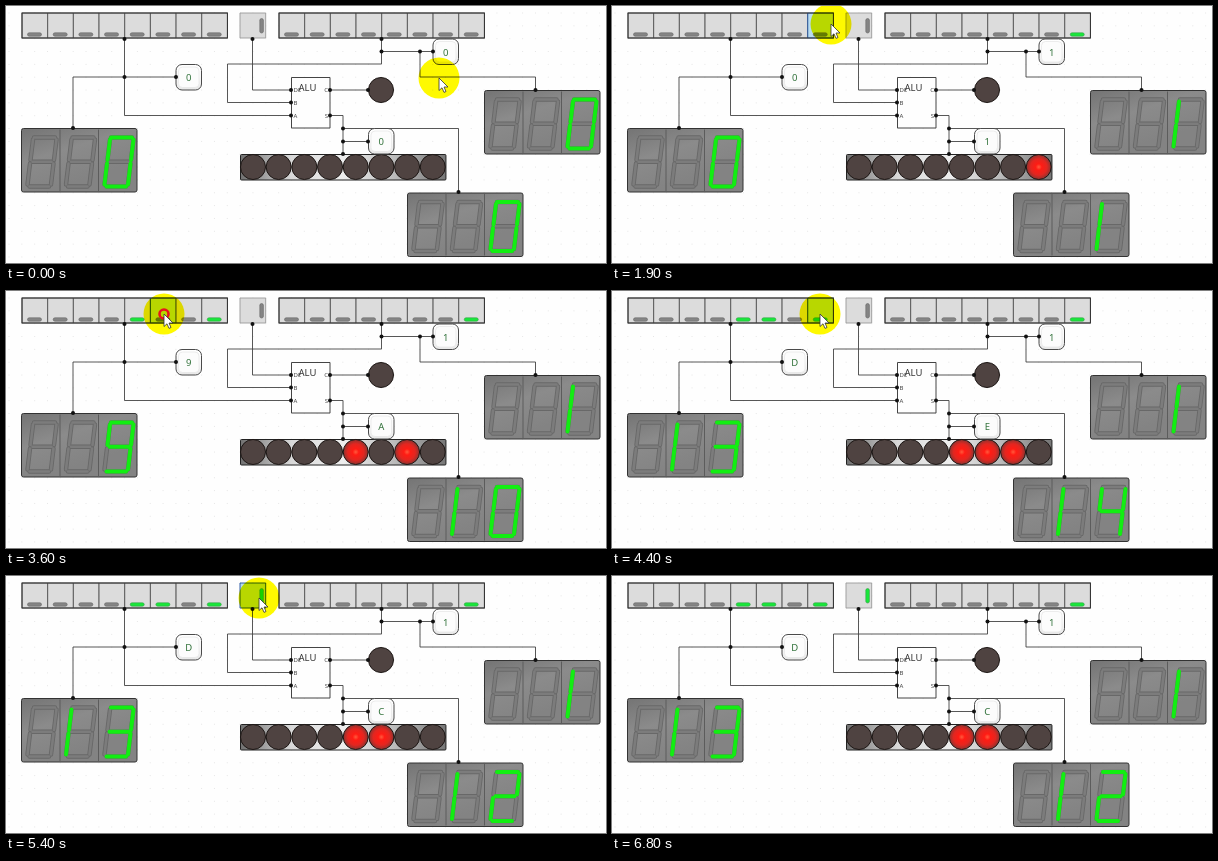
Recreate the animation shown at these times as an HTML page with a canvas. Size 600 px wide and 257 px high, loop 7300 ms.

```html
<!DOCTYPE html>
<html lang="zh">
<head>
<meta charset="utf-8">
<title>8-bit ALU</title>
<style>
  html, body { margin: 0; width: 100%; height: 100%; overflow: hidden; background: #fefefe; }
  canvas { display: block; width: 600px; height: 257px; }
</style>
</head>
<body>
<canvas></canvas>
<script>
const W = 600, H = 257, LOOP = 7300, STEP = 100;
const PITCH = 12.84, CELL = PITCH * 2;
const canvas = document.querySelector('canvas');
const dpr = window.devicePixelRatio || 1;
canvas.width = W * dpr;
canvas.height = H * dpr;
const ctx = canvas.getContext('2d');

const GREEN = '#12ee12', DARK = '#4f4341', SANS = '"Noto Sans", sans-serif';

// Cursor stops: time, x, y
const PATH = [
  [0, 433, 72], [100, 433, 71], [900, 466, 28], [1400, 466, 28],
  [1900, 219, 18], [2100, 208, 23], [2400, 208, 23], [2800, 135, 21],
  [3100, 135, 21], [3400, 158, 23], [3900, 158, 23], [4400, 208, 23],
  [4700, 208, 23], [5100, 253, 22], [5800, 253, 22], [6700, 560, 285]
];
// Each press lights the ring, then flips its input
const PRESSES = [
  { at: 1100, input: 'b', bit: 1 },
  { at: 2100, input: 'a', bit: 1 },
  { at: 2850, input: 'a', bit: 8 },
  { at: 3500, input: 'a', bit: 4 },
  { at: 5100, input: 'sub', bit: 1 }
];
const PRESS_TIME = 200;

// Segments a b c d e f g; "1" uses the left-hand pair
const DIGITS = ['abcdef', 'ef', 'abdeg', 'abcdg', 'bcfg', 'acdfg', 'acdefg', 'abc', 'abcdefg', 'abcdfg'];
const SEGMENTS = {
  a: [12.5, 9, 33.5, 9], b: [35, 11, 32.5, 31.5], c: [32, 35, 29.5, 56],
  d: [8, 58, 27.5, 58], e: [8.5, 35, 6, 56], f: [11.5, 11, 9, 31.5], g: [11, 33.3, 30, 33.3]
};

function cursorAt(t) {
  const next = PATH.findIndex(p => p[0] > t);
  if (next < 0) return [-99, -99];
  const [t0, x0, y0] = PATH[next - 1], [t1, x1, y1] = PATH[next];
  const u = (t - t0) / (t1 - t0), e = u * u * (3 - 2 * u);
  return [x0 + (x1 - x0) * e, y0 + (y1 - y0) * e];
}

function gradient(x0, y0, x1, y1, ...colors) {
  const g = ctx.createLinearGradient(x0, y0, x1, y1);
  colors.forEach((c, i) => g.addColorStop(i / (colors.length - 1), c));
  return g;
}

function box(x, y, w, h, r, fill, stroke = '#333', line = 1) {
  ctx.beginPath();
  ctx.roundRect(x, y, w, h, r);
  ctx.fillStyle = fill;
  ctx.fill();
  ctx.strokeStyle = stroke;
  ctx.lineWidth = line;
  ctx.stroke();
}

function disc(x, y, r, fill, stroke) {
  ctx.beginPath();
  ctx.arc(x, y, r, 0, 7);
  ctx.fillStyle = fill;
  ctx.fill();
  if (stroke) {
    ctx.strokeStyle = stroke;
    ctx.lineWidth = 1;
    ctx.stroke();
  }
}

function text(str, x, y, size, color, align = 'center', font = SANS) {
  ctx.font = `${size}px ${font}`;
  ctx.textAlign = align;
  ctx.textBaseline = 'alphabetic';
  ctx.fillStyle = color;
  ctx.fillText(str, x, y);
}

function wire(...points) {
  ctx.beginPath();
  for (let i = 0; i < points.length; i += 2) ctx.lineTo(points[i], points[i + 1]);
  ctx.strokeStyle = '#444';
  ctx.lineWidth = 0.9;
  ctx.stroke();
}

function drawGrid() {
  ctx.fillStyle = '#e6e6e6';
  for (let x = 2.5; x < W; x += PITCH)
    for (let y = 6.5; y < H; y += PITCH) ctx.fillRect(x, y, 1, 1);
}

function drawWires() {
  wire(118.5, 33, 118.5, 109.5, 285, 109.5);
  wire(67, 122, 67, 71, 170, 71);
  wire(246.5, 33, 246.5, 84, 285, 84);
  wire(375.5, 33, 375.5, 58, 221.5, 58, 221.5, 96.5, 285, 96.5);
  wire(375.5, 45.5, 427, 45.5);
  wire(414, 45.5, 414, 71, 529.5, 71, 529.5, 84);
  wire(324, 84, 362, 84);
  wire(324, 109.5, 337, 109.5, 337, 148);
  wire(337, 122.5, 452.5, 122.5, 452.5, 186);
  wire(337, 135.5, 362, 135.5);
}

function drawNodes() {
  const nodes = [
    [118.5, 33], [118.5, 71], [67, 122], [170, 71], [246.5, 33], [375.5, 33],
    [375.5, 45.5], [414, 45.5], [427, 45.5], [529.5, 84], [285, 84], [285, 96.5],
    [285, 109.5], [324, 84], [324, 109.5], [362, 84], [337, 122.5], [337, 135.5],
    [362, 135.5], [337, 148], [452.5, 186]
  ];
  for (const [x, y] of nodes) disc(x, y, 2, '#111');
}

function drawSwitch(x, on, upright, [cx, cy]) {
  const y = 7, h = 25;
  const hover = cx >= x && cx < x + CELL && cy >= y && cy < y + h;
  box(x, y, CELL, h, 0, hover ? '#b8dcf0' : '#dcdcdc',
    hover ? '#1c4c9c' : upright ? '#999' : '#555', 0.9);
  const color = on ? (hover ? '#16d8d8' : '#18e83a') : hover ? '#62808e' : '#858585';
  const edge = on ? '#3a9a4a' : '#666';
  if (upright) box(x + 19.8, 12.5, 3.6, 14.5, 1.8, color, edge, 0.6);
  else box(x + 5.5, 26.8, 14, 3.4, 1.7, color, edge, 0.6);
}

function drawSwitchRow(x, value, cursor) {
  for (let i = 0; i < 8; i++) drawSwitch(x + i * CELL, value >> (7 - i) & 1, false, cursor);
  ctx.strokeStyle = '#333';
  ctx.lineWidth = 1;
  ctx.strokeRect(x, 7, CELL * 8, 25);
}

function drawLed(x, y, on) {
  let fill = DARK;
  if (on) {
    fill = ctx.createRadialGradient(x, y, 0, x, y, 12.5);
    fill.addColorStop(0, '#ff5a3c');
    fill.addColorStop(0.25, '#ff1c14');
    fill.addColorStop(0.65, '#e32620');
    fill.addColorStop(1, '#8a3430');
  }
  disc(x, y, 12.5, fill, '#1c1614');
}

function drawLedBar(value) {
  box(234.5, 148.5, CELL * 8, 25.5, 1, gradient(234, 0, 440, 0, '#707070', '#d8d8d8', '#eee', '#bbb', '#777'), '#222');
  for (let i = 0; i < 8; i++) drawLed(247 + i * CELL, 161, value >> (7 - i) & 1);
}

function drawProbe(x, y, value) {
  box(x, y, 25.5, 25.5, 6, gradient(x, y, x, y + 25, '#fff', '#fafafa', '#e8e8e8'), '#4a4a4a');
  box(x + 2.5, y + 2.5, 20.5, 20.5, 4, '#fcfcfc', '#e6e6e6', 0.7);
  text(value.toString(16).toUpperCase(), x + 12.8, y + 16.5, 9.5, '#2f7038');
}

function strokeSegments(names, color, width) {
  ctx.beginPath();
  for (const name of names) {
    const [x0, y0, x1, y1] = SEGMENTS[name];
    ctx.moveTo(x0, y0);
    ctx.lineTo(x1, y1);
  }
  ctx.strokeStyle = color;
  ctx.lineWidth = width;
  ctx.stroke();
}

function drawDisplay(x, y, value) {
  const w = 115.5, h = 63.5, cell = w / 3;
  box(x, y, w, h, 2, gradient(x, y, x + 20, y + h, '#747474', '#8b8b8b', '#838383'), '#333');
  const digits = String(value).padStart(3, ' ');
  ctx.save();
  ctx.lineCap = 'round';
  ctx.translate(x, y);
  for (let i = 0; i < 3; i++) {
    if (i) {
      ctx.fillStyle = '#5c5c5c';
      ctx.fillRect(-0.5, 1, 1, h - 2);
    }
    strokeSegments('abcdefg', '#686868', 4.4);
    strokeSegments('abcdefg', '#7c7c7c', 2.6);
    if (digits[i] !== ' ') strokeSegments(DIGITS[digits[i]], GREEN, 4);
    ctx.translate(cell, 0);
  }
  ctx.restore();
}

function drawAlu() {
  box(285.5, 71.5, 38.5, 50.5, 0, '#fefefe', '#444');
  text('ALU', 301.5, 85, 9.5, '#333');
  text('DE', 287.5, 86.3, 6, '#444', 'left');
  text('B', 287.5, 99, 6, '#444', 'left');
  text('A', 287.5, 112, 6, '#444', 'left');
  text('C', 322, 86.3, 6, '#444', 'right');
  text('S', 322, 112, 6, '#444', 'right');
}

function drawTooltip() {
  box(465.5, 40.5, 41, 17, 0, '#f6f6f6', '#999');
  text('8位输入', 486, 52.3, 9, '#666', 'center', '"Noto Sans CJK SC", "Noto Sans CJK", sans-serif');
}

function drawPointer([x, y], pressed) {
  ctx.globalCompositeOperation = 'multiply';
  disc(x, y, 20.5, '#fffa00');
  ctx.globalCompositeOperation = 'source-over';
  if (pressed) {
    ctx.beginPath();
    ctx.arc(x, y, 4.5, 0, 7);
    ctx.strokeStyle = '#e8141c';
    ctx.lineWidth = 2.6;
    ctx.stroke();
  }
  ctx.save();
  ctx.translate(x, y);
  ctx.fillStyle = '#fff';
  ctx.strokeStyle = '#333';
  ctx.lineWidth = 0.8;
  const arrow = new Path2D('M0 0V12.5L3 9.8L5 14.4L7 13.5L5 9H9Z');
  ctx.fill(arrow);
  ctx.stroke(arrow);
  ctx.restore();
}

function draw(t) {
  const state = { a: 0, b: 0, sub: 0 };
  for (const p of PRESSES) if (t >= p.at + PRESS_TIME) state[p.input] |= p.bit;
  const { a, b, sub } = state;
  const sum = (sub ? a - b : a + b) & 255;
  const pressed = PRESSES.some(p => t >= p.at && t < p.at + PRESS_TIME);
  const cursor = cursorAt(t);

  ctx.setTransform(dpr, 0, 0, dpr, 0, 0);
  ctx.fillStyle = '#fefefe';
  ctx.fillRect(0, 0, W, H);
  drawGrid();
  drawWires();
  drawSwitchRow(16, a, cursor);
  drawSwitch(234, sub, true, cursor);
  drawSwitchRow(273, b, cursor);
  drawAlu();
  drawLed(375, 84, false);
  drawLedBar(sum);
  drawProbe(170, 58.5, a);
  drawProbe(427, 33, b);
  drawProbe(362.5, 122.5, sum);
  drawDisplay(15.5, 122.5, a);
  drawDisplay(478.5, 84.5, b);
  drawDisplay(401.5, 187, sum);
  drawNodes();
  if (t >= 1100 && t < 1400) drawTooltip();
  drawPointer(cursor, pressed);
}

function frame() {
  const t = performance.now() % LOOP;
  draw(Math.floor(t / STEP) * STEP);
  requestAnimationFrame(frame);
}
frame();
</script>
</body>
</html>
```
